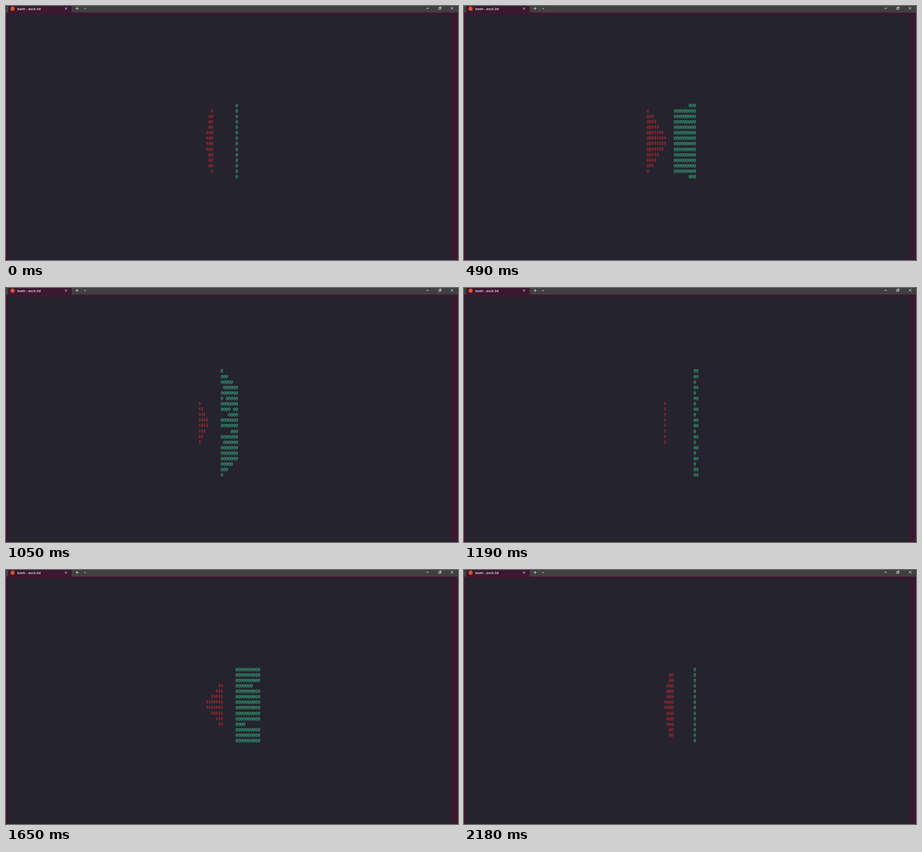
An HTML page with a canvas that plays this animation: 998x561 px, repeating every 2.31 s.

```html
<!DOCTYPE html>
<html>
<head>
<meta charset="utf-8">
<style>
html, body { margin: 0; width: 100%; height: 100%; overflow: hidden; background: #3a1830; }
canvas { display: block; }
</style>
</head>
<body>
<canvas id="stage" width="998" height="561"></canvas>
<script>
const ctx = document.getElementById("stage").getContext("2d");
const LOOP = 2310, CELL_W = 5.45, CELL_H = 12.1;
const RAD = Math.PI / 180;

// Moments at which the terminal repaints
const ticks = [0, 70, 210, 280, 350, 490, 560, 630, 700, 770, 840, 910, 980, 1050, 1120,
  1190, 1320, 1390, 1520, 1650, 1780, 1850, 1920, 2050, 2180];

// Turning angles in degrees; 0 points at the viewer, negative to the left
const keyTimes = [0, 490, 770, 1050, 1320, 1650, 2180];
const panelTurn = [-180, -111, -74.4, -29.3, 29.5, 82.6, 178];
const wedgeTurn = [10, -51, -88, -148, -206.8, -252, -346.2];

// Distances of the panel's rulings from its middle
const rulings = [0.5, 1.5, 2.52, 3.47, 3.6, 4.53, 5.5];

function angleAt(turns, t) {
  let i = 0;
  while (i < keyTimes.length - 2 && t >= keyTimes[i + 1]) i++;
  const k = (t - keyTimes[i]) / (keyTimes[i + 1] - keyTimes[i]);
  return (turns[i] + (turns[i + 1] - turns[i]) * k) * RAD;
}

function line(color, points, width = 1) {
  ctx.strokeStyle = color;
  ctx.lineWidth = width;
  ctx.beginPath();
  for (const [x, y] of points) ctx.lineTo(x, y);
  ctx.stroke();
}

function cross(x, y, r) {
  line("#e8e8e8", [[x - r, y - r], [x + r, y + r]]);
  line("#e8e8e8", [[x - r, y + r], [x + r, y - r]]);
}

function drawWindow() {
  const rect = (color, ...box) => { ctx.fillStyle = color; ctx.fillRect(...box); };
  rect("#3a1830", 0, 0, 998, 561);
  rect("#25232d", 4.5, 19.5, 978.5, 541.5);
  rect("#404040", 0, 0, 998, 14.5);
  rect("#3a1830", 5, 0, 140, 15);

  ctx.fillStyle = "#dd5030";
  ctx.beginPath();
  ctx.arc(14.5, 6, 4.7, 0, 7);
  ctx.fill();

  ctx.fillStyle = "#f4f0f3";
  ctx.font = "600 7.6px 'Open Sans', sans-serif";
  ctx.textAlign = "left";
  ctx.fillText("bash - ascii-3d", 25, 9);

  cross(132.5, 5.7, 2.5);
  line("#e8e8e8", [[153.5, 5.5], [160.5, 5.5]]);
  line("#e8e8e8", [[157, 2], [157, 9]]);
  line("#555555", [[166.5, 1], [166.5, 11]]);
  line("#e8e8e8", [[172.3, 4.3], [174.7, 6.7], [177.1, 4.3]]);
  line("#e8e8e8", [[928, 5], [934, 5]]);
  ctx.strokeRect(955.5, 3.5, 4, 4);
  line("#e8e8e8", [[957, 2], [961, 2], [961, 6]], 0.8);
  cross(985, 5, 2.8);
}

function printCells(cells, color) {
  ctx.fillStyle = color;
  ctx.font = "9px 'DejaVu Sans Mono', monospace";
  ctx.textAlign = "center";
  for (const [key, char] of cells) {
    const [col, row] = key.split(",");
    ctx.fillText(char, 509.4 + col * CELL_W, 221.7 + row * CELL_H);
  }
}

// Panel hinged on one side, drawn as horizontal rulings
function panelCells(turn) {
  const cells = new Map();
  for (let i = 0; i <= 100; i++) {
    const u = i / 100;
    const near = 1 / (1 - 0.371 * u * Math.cos(turn));
    const x = 0.3 + 0.7 * (near - 1) + 8.85 * u * near * Math.sin(turn);
    for (const v of rulings) {
      for (const side of [-1, 1]) {
        const y = 7.03 + side * v * 1.122 * near;
        cells.set(Math.floor(x) + "," + Math.floor(y), "@");
      }
    }
  }
  return cells;
}

// Solid triangle turning about its tip; the nearer part prints denser
function wedgeCells(turn) {
  const cells = new Map();
  for (let i = 0; i <= 400; i++) {
    const u = i / 400, depth = u * Math.cos(turn);
    const near = 1 / (1 - 0.31 * depth);
    const col = Math.floor(0.6 + 7.05 * u * near * Math.sin(turn)) - 12;
    const reach = Math.max(0, Math.floor(4.15 * u * near - 0.13));
    for (let row = 6 - reach; row <= 7 + reach; row++)
      cells.set(col + "," + row, depth > 0.54 ? "@" : "$");
  }
  return cells;
}

const start = performance.now();
let shown = -1;

function frame() {
  const now = (performance.now() - start) % LOOP;
  const t = ticks.filter(tick => tick <= now).pop() || 0;
  if (t !== shown) {
    shown = t;
    drawWindow();
    printCells(wedgeCells(angleAt(wedgeTurn, t)), "#dc2a34");
    printCells(panelCells(angleAt(panelTurn, t)), "#3cd698");
  }
  requestAnimationFrame(frame);
}
frame();
</script>
</body>
</html>
```
